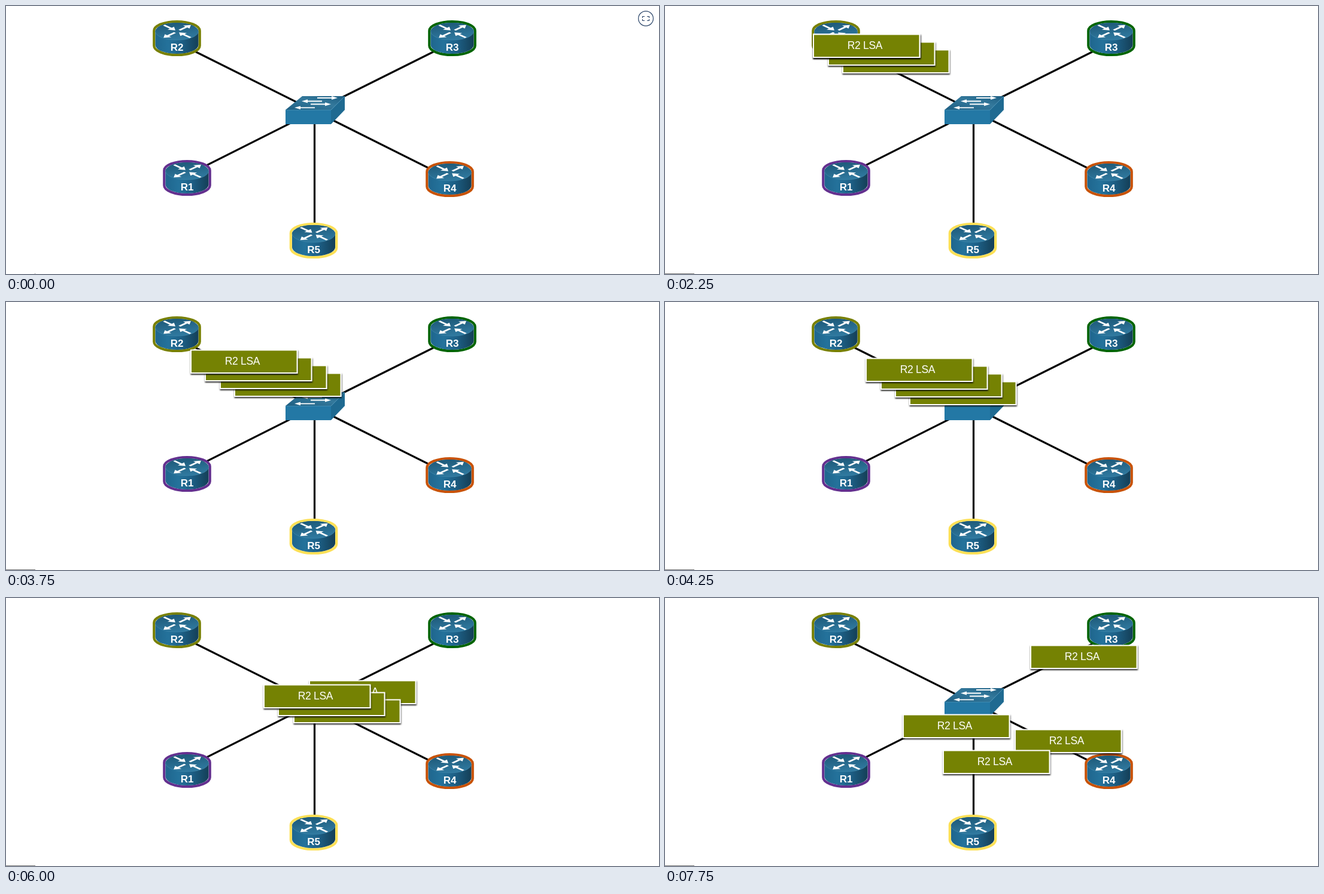
These frames come from a looping animation (1091x449 px, 8000 ms). An HTML page:

```html
<!DOCTYPE html>
<html lang="en">
<head>
<meta charset="utf-8">
<title>Flooding link-state advertisements</title>
<style>
  html, body { margin: 0; width: 100%; height: 100%; overflow: hidden; background: #fff; }
  svg { display: block; width: 1091px; height: 449px; }
  text { font-family: "Liberation Sans", Arial, sans-serif; font-size: 17.5px; fill: #fff; text-anchor: middle; }
  .card text { letter-spacing: -.3px; }
  .label { font-size: 17px; font-weight: bold; }
</style>
</head>
<body>
<svg id="stage" viewBox="0 0 1091 449">
  <defs>
    <linearGradient id="body">
      <stop offset="0" stop-color="#1f668e"/>
      <stop offset=".3" stop-color="#24729b"/>
      <stop offset=".6" stop-color="#1d6087"/>
      <stop offset="1" stop-color="#143f57"/>
    </linearGradient>
    <linearGradient id="lid" x1="0" y1="0" x2=".3" y2="1">
      <stop offset="0" stop-color="#1c5675"/>
      <stop offset="1" stop-color="#2f789e"/>
    </linearGradient>
    <linearGradient id="deck" x1="0" y1="1" x2="1" y2="0">
      <stop offset="0" stop-color="#1d5e82"/>
      <stop offset=".55" stop-color="#34799c"/>
      <stop offset="1" stop-color="#1d5e82"/>
    </linearGradient>
    <filter id="shadow" x="-5%" y="-20%" width="110%" height="150%">
      <feDropShadow dx=".5" dy="2" stdDeviation="1.2" flood-color="#000" flood-opacity=".8"/>
    </filter>
  </defs>
  <g id="links" stroke="#000" stroke-width="3.2"></g>
  <g id="switch">
    <path d="M467 174L495 151H566L543 174Z" fill="url(#deck)"/>
    <path d="M543 174L566 151V174L543 198Z" fill="#1f6a91"/>
    <path d="M467 174H543V198H467Z" fill="#2378a5"/>
    <path d="M467 174.3H543L566 151" fill="none" stroke="#4b94b8" stroke-width=".8"/>
  </g>
  <g id="routers"></g>
  <g id="cards"></g>
  <g id="expand" fill="none" stroke="#2b4569" stroke-width="1.2">
    <circle cx="1069" cy="21" r="12.4"/>
    <path d="M1067 17.5H1063.5V20M1071 17.5H1074.5V20M1067 24.5H1063.5V22M1071 24.5H1074.5V22"/>
  </g>
  <rect id="progress" y="448" height="1" fill="#777"/>
</svg>
<script>
const LOOP = 8000, STEP = 250;
const HUB = { x: 515.5, y: 176 };
const START = { x: 247, y: 47 }, TURN = { x: 463.6, y: 162.7 };
const DEPART = 1274, TRAVEL = 3994, GAP = 450, APPEAR = 1250;

// port is where the cable ends, hidden behind the router.
const routers = [
  { name: 'R2', x: 285.5, y: 54, port: [285.5, 61], color: '#788000' },
  { name: 'R3', x: 745.5, y: 54, port: [745.5, 61], color: '#006400' },
  { name: 'R1', x: 302.5, y: 288, port: [302.5, 283.4], color: '#64308f' },
  { name: 'R4', x: 741.5, y: 290, port: [741.5, 289.3], color: '#c85204' },
  { name: 'R5', x: 514, y: 393, port: [515.5, 393], color: '#fde056' }
];

// Speed of each card in px/s once it has left the hub: to R3, R4, R5, R1.
const branches = [
  { x: 59.3, y: -33.8 },
  { x: 59.6, y: 28.6 },
  { x: 0, y: 58.7 },
  { x: -59.4, y: 28.8 }
];

const byId = id => document.getElementById(id);

// Arrow lying along the x axis, starting at the origin.
const arrow = (length, shaft, head, transform) => {
  const neck = length - head.length;
  return `<path fill="#fff" transform="${transform}" d="M0 ${-shaft}H${neck}V${-head.half}
    L${length} 0L${neck} ${head.half}V${shaft}H0Z"/>`;
};

const cylinder = (rx, ry, top, bottom) =>
  `M${-rx} ${top}A${rx} ${ry} 0 0 1 ${rx} ${top}V${bottom}A${rx} ${ry} 0 0 1 ${-rx} ${bottom}Z`;

const routerArrow = (x, y, angle) =>
  arrow(25, 2.1, { length: 10, half: 7 }, `translate(${x} ${y}) rotate(${angle})`);

const routerMarkup = ({ name, x, y, color }) => `
  <g transform="translate(${x} ${y})">
    <path d="${cylinder(38.2, 15.5, -12.5, 12.5)}" fill="#fff" stroke="${color}" stroke-width="4.2"/>
    <path d="${cylinder(36, 14.5, -11.5, 11.5)}" fill="url(#body)"/>
    <ellipse cy="-11.5" rx="36" ry="14.5" fill="url(#lid)"/>
    <path d="M-36 -11.5A36 14.5 0 0 0 36 -11.5" fill="none" stroke="#3f87ab" stroke-width=".7"/>
    <g transform="translate(0 -11.5) scale(1.08 .5)">
      ${routerArrow(-20, -21, 45)}${routerArrow(4, -4, -45)}
      ${routerArrow(-3, 4, 135)}${routerArrow(21, 21, 225)}
    </g>
    <text class="label" y="21">${name}</text>
  </g>`;

const cardMarkup = `
  <g class="card">
    <rect y="-.5" width="179.5" height="40.5" fill="#fff" filter="url(#shadow)"/>
    <rect x="2" y="1.5" width="175.5" height="36.5" fill="#758203"/>
    <text x="87" y="24.7">R2 LSA</text>
  </g>`;

byId('links').innerHTML = routers.map(({ port: [x, y] }) =>
  `<line x1="${HUB.x}" y1="${HUB.y}" x2="${x}" y2="${y}"/>`).join('');

byId('switch').innerHTML += [[520, 154, 1], [528, 159.5, -1], [509, 164.5, 1], [516, 170.3, -1]]
  .map(([x, y, dir]) => arrow(34, .9, { length: 10, half: 2.9 }, `translate(${x} ${y}) scale(${dir} 1)`))
  .join('');

byId('routers').innerHTML = routers.map(routerMarkup).join('');
byId('cards').innerHTML = branches.map(() => cardMarkup).join('');
const cards = [...document.querySelectorAll('.card')];

// The motion runs slightly late at first and catches up.
const motionClock = t => t - 70 * Math.min(1, Math.max(0, (3750 - t) / 1500));

function cardPosition(index, clock) {
  const elapsed = clock - DEPART - index * GAP;
  const along = Math.min(1, Math.max(0, elapsed / TRAVEL));
  const beyond = Math.max(0, elapsed - TRAVEL - 12) / 1000;
  const place = axis =>
    START[axis] + (TURN[axis] - START[axis]) * along + branches[index][axis] * beyond;
  return { x: place('x'), y: place('y'), started: elapsed >= 0 };
}

function render(time) {
  const t = Math.floor((time % LOOP) / STEP) * STEP;
  const clock = motionClock(t);
  cards.forEach((card, i) => {
    const { x, y, started } = cardPosition(i, clock);
    const waitingOnTop = i === cards.length - 1;
    card.style.display = t >= APPEAR && (started || waitingOnTop) ? '' : 'none';
    card.setAttribute('transform', `translate(${Math.round(x)} ${Math.round(y)})`);
  });
  byId('expand').style.display = t < APPEAR ? '' : 'none';
  const bar = byId('progress');
  bar.setAttribute('x', t < 750 ? 48 : 0);
  bar.setAttribute('width', t < 750 ? 1 : 49);
}

const begin = performance.now();
function tick() {
  render(performance.now() - begin);
  requestAnimationFrame(tick);
}
render(0);
requestAnimationFrame(tick);
</script>
</body>
</html>
```
